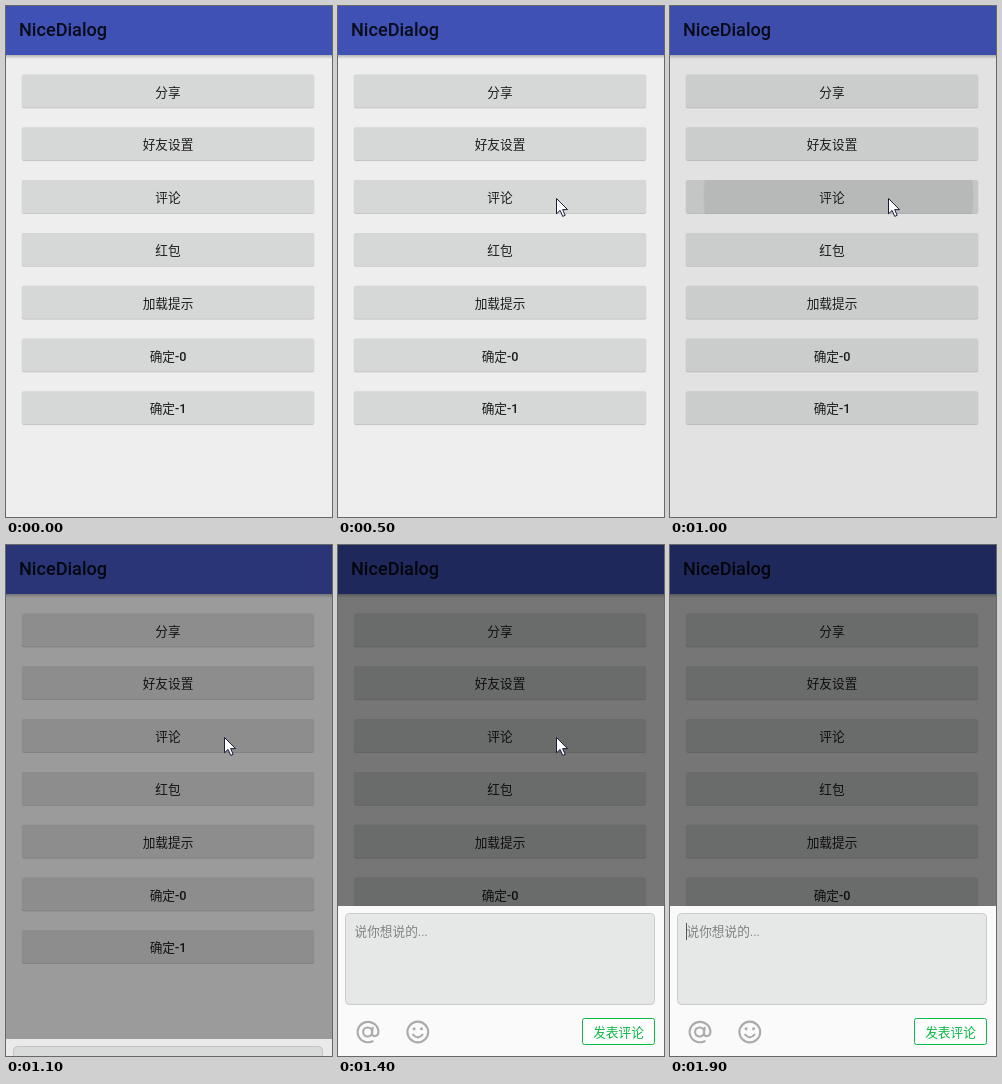
Write an HTML page that moves like this. It is 326x511 px and loops after 2.4 s.

```html
<!DOCTYPE html>
<html lang="zh-CN">
<head>
<meta charset="utf-8">
<title>NiceDialog</title>
<style>
html, body { margin: 0; width: 100%; height: 100%; overflow: hidden; background: #eee; }
svg { display: block; width: 326px; height: 511px; }
text { font: 400 12.68px Roboto, "Noto Sans CJK SC", "Noto Sans CJK", sans-serif; }
.title { font-size: 18.1px; font-weight: 500; fill: #080b18; }
.label { text-anchor: middle; fill: #1b1b1b; }
.label tspan { font-weight: 500; }
.icon { fill: none; stroke: #a9aaaa; stroke-width: 2.1; }

/* Everything advances in hard 100 ms steps of a 2400 ms loop. */
.cursor, .dim, .sheet, .caret, .press, .ripple { animation: 2.4s step-end infinite; }
.cursor { animation-name: cursor; }
.dim { animation-name: dim; }
.sheet { animation-name: sheet; }
.caret { animation-name: caret; }
.press { animation-name: press; }
.ripple { animation-name: ripple; }

@keyframes cursor {
  0% { transform: translate(304px, 153px); visibility: hidden; }
  12.5% { transform: translate(304px, 153px); visibility: visible; }
  16.66% { transform: translate(244px, 180px); visibility: visible; }
  20.83% { transform: translate(218px, 192px); visibility: visible; }
  66.66% { transform: translate(222px, 188px); visibility: visible; }
  70.83% { transform: translate(245px, 167px); visibility: visible; }
  75% { transform: translate(314px, 82px); visibility: visible; }
  79.16%, 100% { transform: translate(314px, 82px); visibility: hidden; }
}
@keyframes dim {
  0% { opacity: 0; }
  41.66% { opacity: .05; }
  45.83% { opacity: .35; }
  50%, 100% { opacity: .5; }
}
@keyframes sheet {
  0% { transform: translateY(160px); opacity: 0; }
  45.83% { transform: translateY(133px); opacity: .83; }
  50%, 100% { transform: none; opacity: 1; }
}
@keyframes caret {
  0% { opacity: 1; }
  58.33% { opacity: 0; }
  79.16%, 100% { opacity: 1; }
}
@keyframes press {
  0% { opacity: 0; }
  33.33% { opacity: .02; }
  37.5% { opacity: .03; }
  45.83%, 100% { opacity: 0; }
}
@keyframes ripple {
  0% { transform: translate(218px, 192px) scale(0); }
  33.33% { transform: translate(210px, 192px) scale(32); }
  37.5% { transform: translate(188px, 191px) scale(86); }
  41.66% { transform: translate(168.5px, 191px) scale(135); }
  45.83%, 100% { transform: translate(162px, 191px) scale(0); }
}
</style>
</head>
<body>
<svg viewBox="0 0 326 511">
  <defs>
    <linearGradient id="shade" x2="0" y2="1">
      <stop stop-opacity=".24"/><stop offset="1" stop-opacity="0"/>
    </linearGradient>
    <clipPath id="pressed"><rect x="16" y="174.1" width="292" height="33" rx="2"/></clipPath>
  </defs>

  <rect width="326" height="511" fill="#eee"/>
  <rect y="49" width="326" height="4" fill="url(#shade)"/>
  <rect width="326" height="49" fill="#3f51b5"/>
  <text class="title" x="13" y="30.3">NiceDialog</text>

  <g id="buttons"></g>
  <g clip-path="url(#pressed)">
    <rect class="press" x="16" y="174" width="292" height="34"/>
    <circle class="ripple" r="1" fill-opacity=".065"/>
  </g>
  <g id="labels"></g>

  <rect class="dim" width="326" height="511"/>

  <g class="sheet">
    <rect y="361" width="326" height="150" fill="#fafafa"/>
    <rect x="7.5" y="368.5" width="309" height="91" rx="4" fill="#e6e8e7" stroke="#c9cbca"/>
    <text x="16.5" y="391.2" fill="#808282">说你想说的...</text>
    <rect class="caret" x="16" y="378" width="1" height="17" fill="#555"/>
    <g class="icon">
      <circle cx="29.6" cy="487" r="4.5"/>
      <path d="M34.7 481.8 L34 488.4 C34 492.6 40.4 492 40.4 486.4 A10.4 10.2 0 1 0 35.4 495.8"/>
      <circle cx="79.8" cy="487" r="10.4"/>
      <path d="M74.6 489.2 Q79.8 495.6 85 489.2"/>
    </g>
    <g fill="#a9aaaa"><circle cx="76.1" cy="483.8" r="1.5"/><circle cx="83.5" cy="483.8" r="1.5"/></g>
    <rect x="244.5" y="473.5" width="72" height="26" rx="2" fill="#fff" stroke="#08b943"/>
    <text x="280.5" y="491.6" text-anchor="middle" fill="#08b943">发表评论</text>
  </g>

  <path class="cursor" d="M.5 .5 V15.8 L4.1 12.4 L6.7 18.4 L9.2 17.3 L6.6 11.6 H11.5 Z"
        fill="#fff" stroke="#171a3a"/>
</svg>
<script>
const labels = ["分享", "好友设置", "评论", "红包", "加载提示", "确定-0", "确定-1"];
const pitch = 52.8;
const byId = id => document.getElementById(id);
const each = draw => labels.map((label, i) => draw(label, i * pitch)).join("");

byId("buttons").innerHTML = each((_, y) => `
  <rect x="15.5" y="${68.5 + y}" width="293" height="34" rx="2.5" fill-opacity=".06"/>
  <rect x="16" y="${69.2 + y}" width="292" height="33" rx="2" fill-opacity=".14"/>
  <rect x="16" y="${68.5 + y}" width="292" height="33" rx="2" fill="#d6d8d7"/>`);
byId("labels").innerHTML = each((label, y) =>
  `<text class="label" x="162" y="${90.6 + y}">${label.replace(/-\d/, "<tspan>$&</tspan>")}</text>`);
</script>
</body>
</html>
```
